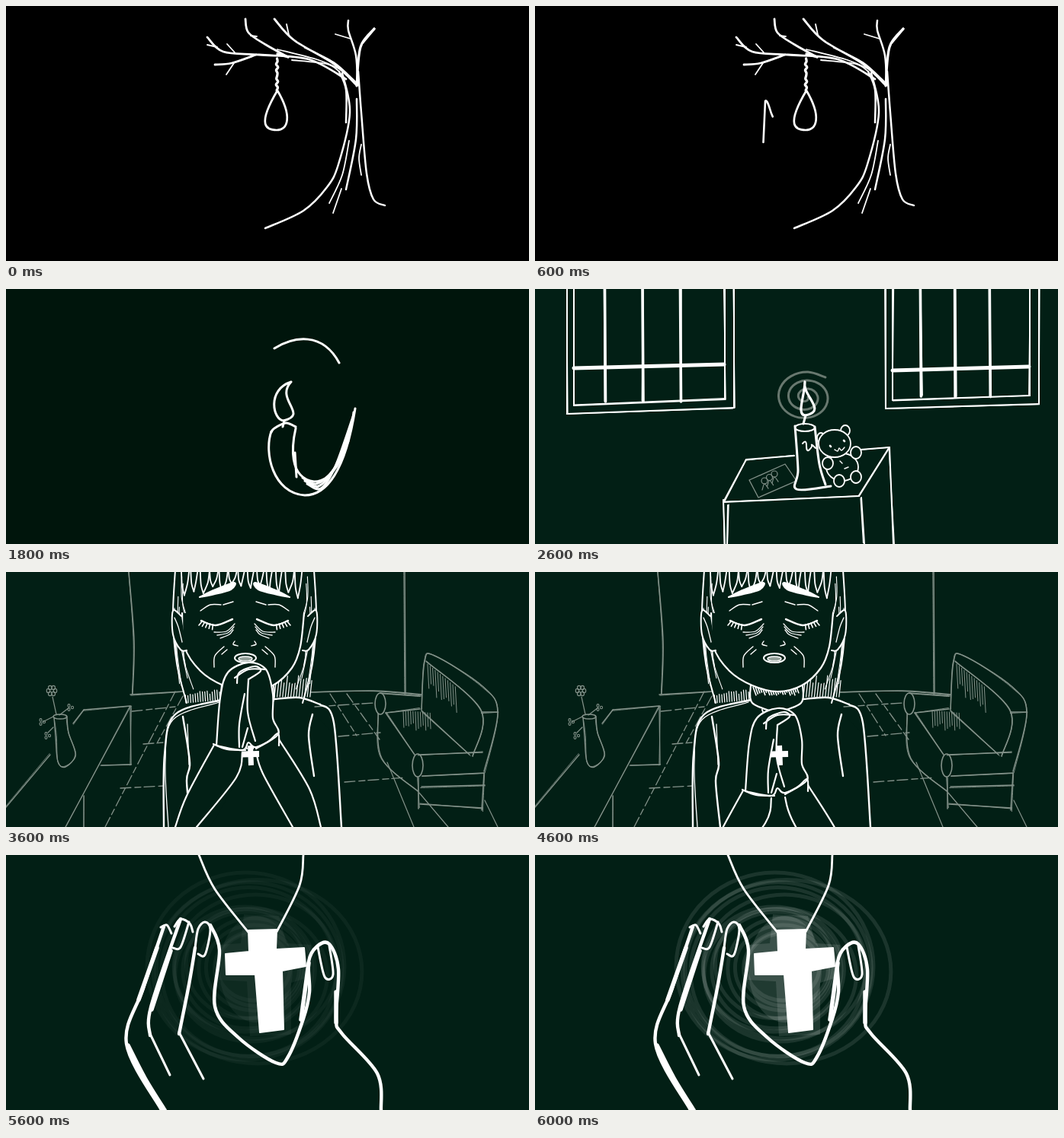
An HTML page that plays this animation: 686x335 px, repeating every 6.2 s.

```html
<!DOCTYPE html>
<html lang="en">
<head>
<meta charset="utf-8">
<title>Candle and cross</title>
<style>
html, body { margin: 0; width: 100%; height: 100%; overflow: hidden; background: #000; }
svg { display: block; width: 100%; height: 100%; animation: night 6.2s step-end infinite; }
path { fill: none; stroke: #fff; stroke-linecap: round; stroke-linejoin: round; }
g, #letter, #morph path { animation: 6.2s step-end infinite; }
.solid { fill: #021f15; }
.white { fill: #fff; }
.grey { fill: #93a099; }
#back path, #photo path { stroke: #84928a; }
#tiles path { stroke-dasharray: 14 5 8 4; }
#spiral path { stroke: #68786f; }
#halo path { stroke-opacity: .1; }
#aura path { fill: #fff; fill-opacity: .12; stroke: none; }
#pendant path { stroke-linecap: butt; }

/* One drawing lasts 1/31 of the loop, 3.2258% */
@keyframes night {
  0%, 19.35% { background: #000; animation-timing-function: steps(3); }
  29.03% { background: #00150c; animation-timing-function: steps(3); }
  38.7%, 100% { background: #021f15; }
}
#tree { animation-name: tree; }
@keyframes tree {
  0%, 19.35% { opacity: 1; }
  22.58% { opacity: .5; }
  25.8% { opacity: .2; }
  29.03%, 100% { opacity: 0; }
}
#letter { stroke-dasharray: 1 2; animation-name: write; }
@keyframes write {
  0%, 3.22% { stroke-dashoffset: 1.05; animation-timing-function: steps(4); }
  16.12%, 100% { stroke-dashoffset: 0; }
}
#morph { animation-name: morph; }
@keyframes morph { 0% { visibility: hidden; } 22.58% { visibility: visible; } 41.93%, 100% { visibility: hidden; } }
#morph path { stroke-width: 3; }
#morph #flame { animation-name: flame; }
@keyframes flame {
  0%, 19.35% { d: path("M356 111C328 158 342 163 355 163C370 163 376 145 356 111"); animation-timing-function: steps(3); }
  29.03% { d: path("M374 122C342 132 350 172 364 173C398 165 352 145 374 122"); animation-timing-function: steps(4); }
  41.93%, 100% { d: path("M354 122C354 140 342 166 355 166C384 160 350 140 354 122"); }
}
#morph #wick { animation-name: wick; }
@keyframes wick {
  0%, 19.35% { d: path("M355 68L356 111"); animation-timing-function: steps(3); }
  29.03% { d: path("M365 173L363 181"); animation-timing-function: steps(4); }
  41.93%, 100% { d: path("M355 166L352 177"); }
}
#morph #arc { animation-name: arc; }
@keyframes arc {
  0%, 19.35% { d: path("M356 65C385 68 420 70 446 95"); animation-timing-function: steps(3); }
  29.03% { d: path("M352 78C378 62 415 56 437 97"); opacity: 1; animation-timing-function: steps(4); }
  41.93%, 100% { d: path("M318 130C325 108 382 104 391 142"); opacity: .4; }
}
#morph #outer { animation-name: outer; }
@keyframes outer {
  0%, 19.35% { d: path("M441 88C462 150 445 200 421 238C400 272 385 265 340 292"); animation-timing-function: steps(3); }
  29.03% { d: path("M458 157C445 240 420 271 392 271C350 268 338 215 348 187"); animation-timing-function: steps(4); }
  41.93%, 100% { d: path("M388 259C375 262 360 262 343 263C354 250 342 215 341 180"); }
}
#morph #inner { animation-name: inner; }
@keyframes inner {
  0%, 19.35% { d: path("M460 122C455 160 465 200 452 225C446 240 434 260 429 272"); animation-timing-function: steps(3); }
  29.03% { d: path("M456 162C449 215 430 253 404 253C370 248 375 205 380 183"); animation-timing-function: steps(4); }
  41.93%, 100% { d: path("M381 257C378 248 374 240 373 230C369 215 368 195 367 181"); }
}
#scrawl { animation-name: scrawl; }
@keyframes scrawl { 0% { opacity: 0; } 25.8% { opacity: 1; } 32.25%, 100% { opacity: 0; } }
#room { animation-name: room; }
@keyframes room { 0% { opacity: 0; } 35.48% { opacity: .3; } 38.7% { opacity: .7; } 41.93% { opacity: 1; } 51.61%, 100% { opacity: 0; } }
#candle { animation-name: candle; }
@keyframes candle { 0% { visibility: hidden; } 41.93% { visibility: visible; } 51.61%, 100% { visibility: hidden; } }
#spiral { transform-origin: 355px 142px; animation-name: spiral; }
@keyframes spiral { 0%, 41.93% { transform: none; } 45.16% { transform: rotate(12deg); } 48.38%, 100% { transform: rotate(24deg); } }
#woman { animation-name: woman; }
@keyframes woman { 0% { visibility: hidden; } 51.61% { visibility: visible; } 87.09%, 100% { visibility: hidden; } }
#pray { animation-name: pray; }
@keyframes pray { 0% { opacity: 1; } 77.41%, 100% { opacity: 0; } }
#hands { animation-name: hands; }
@keyframes hands { 0%, 64.51% { transform: none; animation-timing-function: steps(4); } 77.41%, 100% { transform: translateY(80px); } }
#chest { animation-name: chest; }
@keyframes chest { 0% { opacity: 0; } 77.41%, 100% { opacity: 1; } }
#close { animation-name: close; }
@keyframes close { 0% { visibility: hidden; } 87.09%, 100% { visibility: visible; } }
#glow { animation-name: glow; }
@keyframes glow { 0% { opacity: .1; } 90.32% { opacity: .4; } 93.54% { opacity: .7; } 96.77%, 100% { opacity: 1; } }
</style>
</head>
<body>
<svg viewBox="0 0 686 335" preserveAspectRatio="none">
  <g id="tree">
    <path id="letter" pathLength="1" stroke-width="2.6" d="M299.500 179L302 125Q304 122 308 135Q315 160 334 168L325 115"/>
  </g>
  <g id="room"><g id="photo"></g></g>
  <g id="candle"><g id="spiral"></g></g>
  <g id="morph">
    <path id="outer"/><path id="inner"/><path id="arc"/><path id="wick"/><path id="flame"/>
    <g id="scrawl"></g>
  </g>
  <g id="woman">
    <g id="back"><g id="tiles"></g></g>
    <g id="body"></g>
    <g id="head"></g>
    <g id="pray"><g id="hands"></g></g>
    <g id="chest"></g>
    <g id="pendant"></g>
  </g>
  <g id="close"><g id="glow"><g id="halo"></g><g id="aura"></g></g></g>
</svg>
<script>
const SVG = 'http://www.w3.org/2000/svg';
let seed = 48271;
const random = () => (seed = seed * 16807 % 2147483647) / 2147483647;
const jitter = size => (random() - .5) * 2 * size;
const each = (count, fn) => { for (let i = 0; i < count; i++) fn(i); };

const parse = text => {
  const n = text.trim().split(/\s+/).map(Number);
  return n.filter((_, i) => i % 2 === 0).map((x, i) => [x, n[2 * i + 1]]);
};
// Smooth curve through a list of points
function curve(p) {
  let d = 'M' + p[0];
  for (let i = 0; i < p.length - 1; i++) {
    const a = p[i], b = p[i + 1], before = p[i - 1] || a, after = p[i + 2] || b;
    const c1 = a.map((v, k) => v + (b[k] - before[k]) / 6);
    const c2 = b.map((v, k) => v - (after[k] - a[k]) / 6);
    d += `C${c1} ${c2} ${b}`;
  }
  return d;
}
function add(id, width, d, cls = '') {
  const path = document.createElementNS(SVG, 'path');
  path.setAttribute('d', d);
  path.setAttribute('stroke-width', width);
  path.setAttribute('class', cls);
  document.getElementById(id).append(path);
}
const ink = (id, width, strokes, cls) =>
  strokes.split('/').forEach(s => add(id, width, curve(parse(s)), cls));
// A stroke gone over twice by a loose hand
const sketch = (id, width, strokes) => strokes.split('/').forEach(s => {
  const p = parse(s);
  add(id, width, curve(p));
  add(id, width * .6, curve(p.map(q => q.map(v => v + jitter(1.6)))));
});
// The same stroke on both sides of an axis
const pair = (id, width, axis, strokes, cls) => strokes.split('/').forEach(s => {
  const p = parse(s);
  add(id, width, curve(p), cls);
  add(id, width, curve(p.map(([x, y]) => [2 * axis - x, y])), cls);
});
const poly = (id, width, points, cls) => add(id, width, `M${points}Z`, cls);
const oval = (id, width, x, y, rx, ry, cls) =>
  add(id, width, `M${x - rx} ${y}a${rx} ${ry} 0 1 0 ${2 * rx} 0a${rx} ${ry} 0 1 0 ${-2 * rx} 0`, cls);
const hatch = (id, width, count, x, y, dx, dy, lx, ly) => each(count, i => {
  const l = .6 + .4 * random();
  add(id, width, `M${x + i * dx} ${y + i * dy}l${lx * l} ${ly * l}`);
});

// Tree
ink('tree', 2.8, '264 41 285 60 332 64 397 70 446 96/274 77 296 75 328 64/314 17 318 35 341 51 370 67/352 17 378 45 430 76 460 104');
ink('tree', 1.8, '264 51 277 54/300 61 290 50/289 90 299 75/321 39 329 40/371 38 368 24/432 37 452 43/356 57 410 71 440 84/392 55 430 74 459 100/375 71 420 76 437 86');
ink('tree', 2.5, '449 19 449 32 459 65 461 104/437 86 446 110 446 153/441 88 451 140 436 208 421 238 390 269 340 292/462 86 466 140 473 220 482 254 497 262/460 122 459 175 446 241');
ink('tree', 3.2, '483 30 465 54 460 105/483 30 468 48/356 63 370 67');
ink('tree', 1.8, '450 177 441 222 424 259/466 182 463 200 466 222/440 240 429 272');
add('tree', 3.3, curve(Array.from({ length: 12 }, (_, i) => [355.5 + 1.3 * Math.sin(i * 2.6), 69 + i * 3.8])));
add('tree', 2.7, 'M356 111C328 158 342 163 355 163C370 163 376 145 356 111');

// Trunk curling into a candle
ink('scrawl', 3, '348 188 352 183 367 176 380 181/379 215 381 247');
each(3, i => ink('scrawl', 3, `${389 + i * 3} ${248 + i * 4} ${407 + i * 3} ${256 + i * 3} ${430 + i} ${237 - i * 2} ${449 + i * 3} ${200 - i * 16}`));

// Barred windows
function barred(l, r, yl, yr, cross) {
  sketch('room', 2, `${l} 0 ${l} ${yl}/${r} 0 ${r} ${yr}/${l} ${yl} ${r} ${yr}`);
  sketch('room', 2, `${l + 9} 0 ${l + 9} ${yl - 11}/${r - 12} 0 ${r - 12} ${yr - 11}/${l + 9} ${yl - 11} ${r - 12} ${yr - 11}`);
  each(3, i => {
    const x = l + (r - l) * .226 * (i + 1);
    sketch('room', 3.6, `${x} 0 ${x + 1} ${yl - 16}`);
  });
  ink('room', 5, `${l + 9} ${cross + 2} ${r - 13} ${cross - 3}`);
}
barred(42, 261, 164, 156, 102);
barred(460, 661, 157, 151, 105);

// Table, photo and bear
sketch('room', 2, '277 224 340 219/427 211 465 208/277 224 247 280/465 208 425 272/247 280 425 272/253 284 252 335/247 277 249 335/428 274 432 335/465 208 470 335');
poly('photo', 1.3, '281 251L328 230L343 252L293 274');
each(3, i => {
  const x = 301 + i * 6.5, y = 252 - i * 4.5;
  oval('photo', 1.2, x, y, 4, 4);
  ink('photo', 1.2, `${x - 3} ${y + 12} ${x} ${y + 4} ${x + 5} ${y + 10}`);
});
oval('room', 1.8, 375, 196, 5, 7, 'solid');
oval('room', 1.8, 407, 186, 6, 7, 'solid');
oval('room', 1.8, 403, 234, 21, 18, 'solid');
oval('room', 1.8, 393, 203, 21, 18, 'solid');
[[384, 229], [421, 215], [399, 252], [421, 247]].forEach(([x, y]) => oval('room', 1.8, x, y, 7, 8, 'solid'));
ink('room', 2.6, '387 206 388 207/405 199 406 200');
ink('room', 1.4, '393 211 397 213 399 209 402 212 406 208/400 226 403 229/406 236 411 234');

// Candle
add('spiral', 3, curve(Array.from({ length: 30 }, (_, i) => {
  const a = i * .62, r = 3 + i * 1.28;
  return [355 + r * Math.cos(a), 142 + r * .85 * Math.sin(a)];
})));
poly('candle', 0, '341 181L367 181L372 225L383 260L344 263L345 235', 'solid');
ink('candle', 3, '341 180 345 238 343 263 388 259/367 181 373 230 381 257/355 166 352 177');
oval('candle', 2, 354, 182, 13, 5);
add('candle', 2, 'M351 203q5 -6 5 3t4 5t3 -6t5 4');
add('candle', 3.2, 'M354 122C354 140 342 166 355 166C384 160 350 140 354 122');

// Living room
sketch('back', 1.5, '161 0 168 90 166 160/523 0 524 160/163 161 232 157/400 158 482 156 545 161');
sketch('back', 1.3, '102 181 163 176/102 181 88 199/163 176 164 253/125 254 164 253/163 177 78 335/0 309 58 240/102 294 102 335');
ink('tiles', 1.3, '222 157 130 335/232 163 198 225/165 183 222 177/180 226 206 224/150 284 206 281/425 160 460 215/447 160 490 220/405 177 482 172/436 216 491 211/444 276 524 270');
ink('back', 1.2, '542 290 580 335/628 300 645 335/500 250 535 335');

// Vase and flowers
sketch('back', 1.4, '63 191 65 216 68 249 78 256 91 240 82 211 80 190');
oval('back', 1.3, 71, 190, 9, 3);
ink('back', 1.2, '66 187 61 164/70 188 83 178/62 190 48 197/62 204 55 211');
const flower = (x, y, petals, size) => each(petals, i => {
  const a = i * 2 * Math.PI / petals;
  oval('back', 1.1, x + size * Math.cos(a), y + size * Math.sin(a), size / 2, size * .6);
});
flower(60, 156, 6, 4.5);
[[84, 178], [47, 197], [54, 215]].forEach(([x, y]) => flower(x, y, 3, 3));

// Sofa
sketch('back', 1.5, '545 181 549 118 562 110 625 150 645 185 627 262/551 117 623 182 612 242/645 184 624 184/498 185 543 180/545 182 608 240/498 185 536 240/488 186 493 245 540 288/491 159 544 163');
sketch('back', 1.5, '541 240 625 237/546 268 627 264/545 282 628 280/543 305 625 310/541 270 541 311/627 264 624 313');
oval('back', 1.6, 491, 173, 7, 14);
oval('back', 1.6, 540, 254, 7, 15);
hatch('back', 1, 12, 553, 121, 3.3, 2.7, 2, 36);
hatch('back', 1, 12, 521, 182, 3.2, .3, 1, 25);

// Shoulders, neck and necklace
poly('body', 0, '283 168L220 187L208 215L206 340L445 340L432 215L385 166', 'solid');
ink('body', 2.4, '283 168 222 187 208 240 207 335/232 190 241 250 237 275 243 335/352 167 385 165 412 174');
ink('body', 1.3, '280 171 219 194 209 250 213 335/238 200 240 253');
pair('body', 2.2, 317, '283 148 285 172 317 185');
ink('body', 2, '298 181 316 232/335 184 324 232');
hatch('body', 1.6, 20, 286, 151, 3, 0, 4, 11);

// Hair and face
const middle = 313;
pair('head', 2, middle, '222 -3 219 60 224 120 237 172', 'solid');
each(9, i => {
  const x = 221 + i * 1.6, y = random() * 90;
  pair('head', 1.1, middle, `${x} ${y} ${x} ${y + 30} ${x + 4 + i} ${y + 60 + 20 * random()}`);
});
hatch('head', 1.2, 15, 236, 172, 3.2, -.3, -1, -14);
hatch('head', 1.2, 14, 352, 164, 3.6, 0, 3, -28);
ink('head', 2.2, '231 54 234 98 255 130 285 149 318 157 350 149 375 126 386 98 391 54', 'solid');
pair('head', 2, middle, '230 58 219 51 219 82 229 102 237 103', 'solid');
pair('head', 1.3, middle, '221 60 226 72 231 92');
each(13, i => {
  const x = 230 + i * 12.4, tip = 17 + 14 * Math.abs(i / 6 - 1) + jitter(5), w = 5 + 5 * random();
  ink('head', 1.8, `${x} 0 ${x + 1} ${tip * .6} ${x + 4} ${tip}/${x + 4} ${tip} ${x + w} ${tip * .5} ${x + w + 2} 0`);
});
pair('head', 2, middle, '254 33 270 25 299 14 295 23 270 30 254 33', 'white');
pair('head', 2.4, middle, '256 64 275 70 297 62');
each(5, i => pair('head', 1.6, middle, `${257 + i * 3.6} ${65 + i} ${253 + i * 4.4} ${70 + i * 1.4}`));
pair('head', 1.4, middle, '255 51 268 43 282 43/285 43 298 39');
each(3, i => pair('head', 1.3, middle, `${273 + i * 4} ${79 + i * 4} ${289 + i * 2} ${78 + i * 2} ${300 - i} ${68 + i * 4}`));
pair('head', 1.4, middle, '300 91 298 95 304 97/286 98 274 110 273 125/290 102 283 108');

// Praying
oval('pray', 2, 314, 113, 14, 6);
oval('pray', 1.4, 314, 114, 9, 3, 'grey');
ink('pray', 2.4, '412 174 430 198 440 335/402 187 397 215 404 268');
const arms = (width, strokes, cls = 'solid') => ink('hands', width, strokes, cls);
arms(0, '273 227 237 294 222 340 262 340 302 272 314 233/328 230 337 265 376 340 416 340 398 285 358 220');
arms(2.2, '273 227 237 294 222 335/310 237 302 270 250 335/358 220 398 285 413 335/328 236 337 265 376 335', '');
arms(2.2, '276 228 281 165 291 132 318 119 341 128 350 160 350 192 357 213 328 230 318 224 310 234 276 228');
arms(2.2, '303 146 306 132 326 124 334 130 318 141/318 141 317 184 327 222/313 160 306 200 306 230/300 139 318 128 341 128/317 205 310 230', '');
arms(2.2, '272 226 290 233 314 234/328 232 345 222 357 212 358 228', '');

// Hand on the chest
ink('chest', 2, '292 118 303 114 317 112 330 114 343 119/304 118 316 123 330 117');
ink('chest', 2.2, '309 228 293 235 289 258 306 282 339 304 349 324/339 238 341 254 358 287 370 300/309 228 306 245 320 264 330 255 334 237 339 238/299 263 294 248 303 231/305 255 301 243 306 233');
ink('chest', 2.4, '347 326 368 307 380 289 424 335/352 321 357 335/376 286 381 293/412 174 432 212 452 335/400 188 398 218 408 291');
ink('chest', 1.3, '410 176 430 205 449 300');

ink('pendant', 7, '320.500 228 321.500 254');
ink('pendant', 8, '309 239.500 332 239');

// Close-up
each(13, i => {
  const r = 48 + i * 7.4;
  oval('halo', 5, 322 + jitter(9), 150 + jitter(8), r, r * (.92 + jitter(.05)));
});
poly('aura', 0, '312 78L358 80L368 116L400 118L398 160L374 168L374 236L320 238L316 166L278 164L280 118L308 116');
oval('aura', 0, 328, 150, 48, 70);
ink('close', 2.8, '253 0 274 45 320 104/390 0 385 40 355 101');
poly('close', 2, '318 99L355 98L354 124L391 122L393 146L362 152L364 229L333 233L327 157L289 157L288 130L319 127', 'white');
ink('close', 4.4, '207 94 180 175 158 248 204 335/229 84 190 200 189 237/248 122 240 170 227 235/268 92 280 125 274 199 305 240 354 273 370 265 390 215 398 180 397 140 408 120 424 117 436 150 433 215 441 235 487 287 492 335');
ink('close', 3, '189 235 215 289/227 233 259 294/203 95 211 92 217 103/221 94 229 84 241 90 245 101/240 88 229 121 219 122/248 122 252 97 261 88 268 98 261 131 252 130/409 121 418 160 429 157 424 119');
ink('close', 5.5, '198 122 174 190/160 250 182 293 208 335/216 126 191 203/397 142 387 216/433 180 433 220');
</script>
</body>
</html>
```
